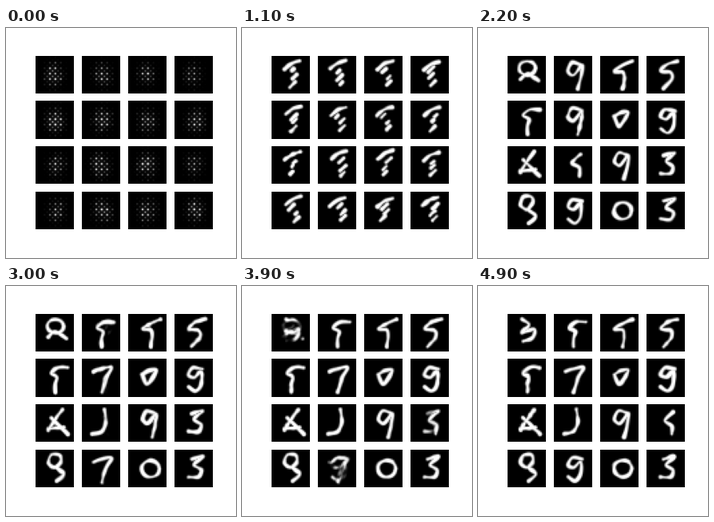
These frames come from a looping animation (288x288 px, 5100 ms). A matplotlib script:

```python
import numpy as np
import matplotlib.pyplot as plt
from matplotlib.animation import FuncAnimation

SIZE = 28                                # cells along one side of a tile
FRAMES, INTERVAL = 51, 100
POSE_FRAMES = [0, 11, 22, 32, 46]
YY, XX = np.mgrid[0:SIZE, 0:SIZE].astype(float)


def ring(cx, cy, rx, ry):
    a = np.linspace(0, 2 * np.pi, 13)
    return np.column_stack([cx + rx * np.cos(a), cy + ry * np.sin(a)]).ravel()


# Each shape is a few strokes, each stroke a run of x, y key points.
SHAPES = {
    "knot": [ring(14, 9, 6, 5), (9, 17, 14, 13, 22, 18)],
    "oval": [ring(16, 14, 6.5, 6)],
    "bent": [(10, 4, 15, 8, 10, 14, 19, 11, 18, 17, 11, 20)],
    "hook": [(23, 6, 16, 6, 11, 10, 15, 13, 14, 18, 14, 24)],
    "stem": [(23, 4, 16, 7, 10, 11, 16, 12, 17, 17, 16, 24)],
    "five": [(22, 4, 15, 6, 10, 11, 17, 12, 18, 17, 12, 24)],
    "seven": [(8, 9, 13, 7, 21, 6, 17, 14, 14, 24)],
    "wedge": [(10, 11, 15, 8, 20, 8, 17, 14, 13, 18, 10, 11)],
    "nine": [(20, 7, 13, 5, 10, 11, 14, 14, 20, 7, 19, 16, 17, 24)],
    "curl": [(20, 7, 13, 6, 10, 11, 14, 13, 19, 9, 19, 18, 15, 23, 10, 20)],
    "eight": [(18, 8, 14, 13, 9, 10, 11, 4, 17, 4, 18, 9, 15, 13, 20, 18, 15, 23)],
    "cross": [(19, 4, 14, 11, 9, 19), (11, 10, 17, 16, 23, 22), (9, 18, 20, 17)],
    "jay": [(16, 4, 17, 13, 14, 20, 7, 22)],
    "zig": [(19, 6, 13, 12, 18, 16, 18, 22)],
    "three": [(12, 7, 20, 5, 14, 11, 19, 15, 17, 20, 10, 20)],
}

# What the sixteen tiles show, row by row, as the training goes on.
STAGES = [
    "knot nine stem five  hook nine wedge curl  cross zig nine three  eight curl oval three",
    "knot hook stem five  hook seven wedge curl  cross jay nine three  eight seven oval three",
    "bent hook stem five  hook seven wedge curl  cross jay nine zig  eight curl oval three",
]


def ripple(rng):
    """Smooth random texture within -1..1."""
    waves = [np.sin(kx * XX + ky * YY + phase)
             for kx, ky, phase in rng.normal(0, (0.45, 0.45, 3), (5, 3))]
    return np.clip(sum(waves) / 3, -1, 1)


def smooth(t):
    t = np.clip(t, 0, 1)
    return t * t * (3 - 2 * t)


def curve(stroke, steps=24):
    """Catmull-Rom curve through the points of a flat x, y stroke."""
    p = np.array(stroke, float).reshape(-1, 2)
    p = np.vstack([p[0], p, p[-1]])
    t = np.linspace(0, 1, steps)[:, None]
    parts = []
    for a, b, c, d in zip(p, p[1:], p[2:], p[3:]):
        parts.append(b + 0.5 * t * (c - a + t * (2 * a - 5 * b + 4 * c - d
                                                 + t * (3 * (b - c) + d - a))))
    return np.vstack(parts)


def ink(strokes, rng):
    """Soft brush strokes of uneven width."""
    pts = np.vstack([curve(s) for s in strokes])
    dist = np.hypot(XX[..., None] - pts[:, 0], YY[..., None] - pts[:, 1]).min(-1)
    width = 1.3 + 0.5 * ripple(rng)
    return np.clip((width + 0.9 - dist) / 1.8, 0, 1)


def dots(rng):
    """Lattice of dots four cells apart, fading away from the middle."""
    level = rng.uniform(0.7, 1.1)
    cx = rng.uniform(12.5, 15)

    def lattice(x0, y0):
        wave = np.cos(np.pi * (XX - x0) / 4) * np.cos(np.pi * (YY - y0) / 4)
        return np.abs(wave) ** 3

    fade = np.exp(-((XX - cx) / 7) ** 2 - ((YY - 14) / 9) ** 2)
    grid = lattice(2, 1) + 0.5 * lattice(0, 3)
    return np.clip(level * fade * grid * (1 + 0.3 * ripple(rng)), 0, 1)


def dabs(rng):
    """An upper arc and a few slanted dabs below it."""
    x, y = rng.uniform(-1, 1, 2)
    strokes = [(9 + x, 10 + y, 14 + x, 6 + y, 20 + x, 4 + y)]
    for row in (11, 15, 20):
        x, y = rng.uniform((13, row - 1), (18, row + 1))
        length = rng.uniform(0.5, 2)
        strokes.append((x - length, y + length, x + length, y - length))
    return ink(strokes, rng)


def build_tile(n):
    rng = np.random.default_rng(n)
    poses = [dots(rng), dabs(rng)]
    poses += [ink(SHAPES[stage.split()[n]], rng) for stage in STAGES]
    delays = [ripple(rng) for _ in poses]
    return poses, delays


def tile_image(n, frame):
    poses, delays = tiles[n]
    i = min(np.searchsorted(POSE_FRAMES, frame, side="right") - 1, len(poses) - 2)
    start, end = POSE_FRAMES[i:i + 2]
    t = min((frame - start) / (end - start), 1)
    # Parts of the tile change over at slightly different moments.
    mix = smooth(1.6 * t - 0.3 + 0.3 * delays[i])
    return smooth(poses[i] + (poses[i + 1] - poses[i]) * mix)


tiles = [build_tile(n) for n in range(16)]

fig, axes = plt.subplots(4, 4, figsize=(4, 4), dpi=72, facecolor="white")
fig.subplots_adjust(left=0.125, right=0.9, bottom=0.125, top=0.88, wspace=0.2, hspace=0.2)
images = []
for n, ax in enumerate(axes.flat):
    ax.axis("off")
    images.append(ax.imshow(tile_image(n, 0), cmap="gray", vmin=0, vmax=1))


def update(frame):
    for n, image in enumerate(images):
        image.set_data(tile_image(n, frame))
    return images


anim = FuncAnimation(fig, update, frames=FRAMES, interval=INTERVAL, repeat=True)
plt.show()
```
